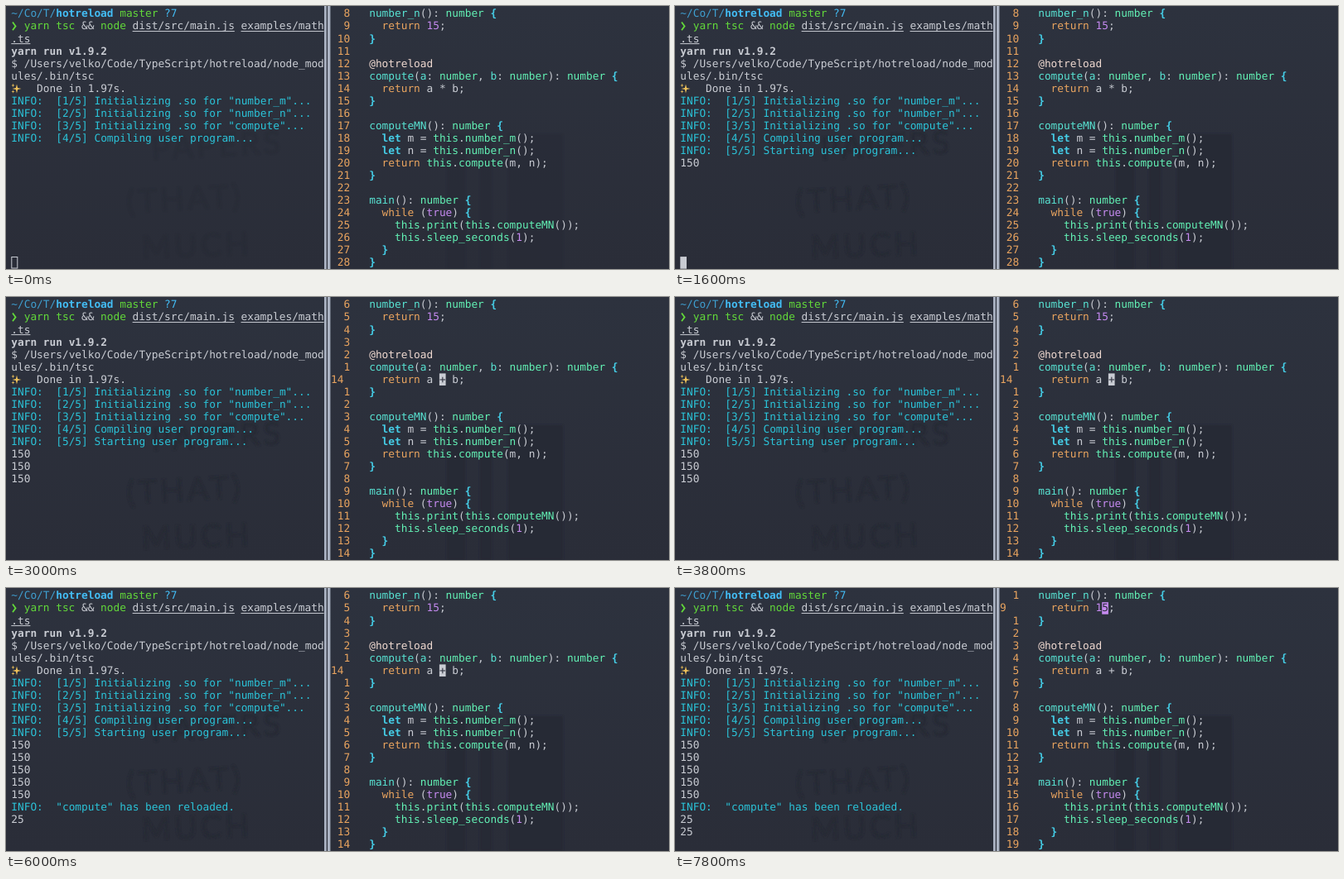
An HTML page that plays this animation: 800x318 px, repeating every 8000 ms.

```html
<!DOCTYPE html>
<html lang="en">
<head>
<meta charset="utf-8">
<title>Hot reload terminal</title>
<style>
  html, body { margin: 0; width: 100%; height: 100%; overflow: hidden; background: #2b2f3b; }
  svg { display: block; width: 100vw; height: 100vh; }
  text { white-space: pre; text-rendering: geometricPrecision; }
  #screen { font: 12.8px "DejaVu Sans Mono", monospace; }
  #wall text { font: 38px Lato, sans-serif; fill: #262a34; letter-spacing: 4px; }
</style>
</head>
<body>
<svg viewBox="0 0 800 318" preserveAspectRatio="none">
  <defs>
    <linearGradient id="shade" x1="0" y1="0" x2="0" y2="1">
      <stop offset="0" stop-color="#2d323e"/>
      <stop offset="1" stop-color="#2a2d38"/>
    </linearGradient>
    <filter id="soft"><feGaussianBlur stdDeviation="1.2"/></filter>
  </defs>
  <rect width="800" height="318" fill="url(#shade)"/>
  <g id="wall" filter="url(#soft)">
    <text x="176" y="186" transform="rotate(-3 176 186)">PAPERS</text>
    <text x="146" y="250" transform="rotate(-3 146 250)">(THAT)</text>
    <text x="164" y="305" transform="rotate(-2 164 305)">MUCH</text>
    <path d="M532 155h22v163h-22zM572 155h14v163h-14zM606 155h66v163h-66z" fill="#272b35"/>
  </g>
  <g id="screen"></g>
  <path d="M384 0h2.8v318h-2.8zM388 0h3.4v318h-3.4z" fill="#a9b1c1"/>
</svg>
<script>
const LOOP = 8000, CW = 7.7, RH = 15.05, BASE = 13.4;
const LEFT = 6.3, PANE = 392, CODE = 438.2;
const C = {
  text: '#c9ccd3', cyan: '#2bc3d8', sky: '#43bdf5', path: '#3f9fd0', green: '#62d83a',
  orange: '#e9a45f', purple: '#c58af0', mint: '#62f0b4', def: '#58e2d2', key: '#45cde6',
  deco: '#efd9d0', back: '#2b2f3b'
};
const FIRST = 7;
const SOURCE = `@hotreload
number_n(): number {
  return 15;
}

@hotreload
compute(a: number, b: number): number {
  return a * b;
}

computeMN(): number {
  let m = this.number_m();
  let n = this.number_n();
  return this.compute(m, n);
}

main(): number {
  while (true) {
    this.print(this.computeMN());
    this.sleep_seconds(1);
  }
}`.split('\n');

// Output lines: time shown, text, colour
const OUTPUT = [
  [0, 'INFO:  [1/5] Initializing .so for "number_m"...', C.cyan],
  [0, 'INFO:  [2/5] Initializing .so for "number_n"...', C.cyan],
  [0, 'INFO:  [3/5] Initializing .so for "compute"...', C.cyan],
  [0, 'INFO:  [4/5] Compiling user program...', C.cyan],
  [800, 'INFO:  [5/5] Starting user program...', C.cyan],
  ...[1, 2, 3, 4, 5].map(s => [s * 1000, '150', C.text]),
  [5200, 'INFO:  "compute" has been reloaded.', C.cyan],
  [6000, '25', C.text],
  [7000, '25', C.text]
];

// Editor cursor: start time, line (0 = unfocused), column
const CURSOR = [
  [0, 0, 0], [2000, 14, 11], [4400, 0, 0], [6000, 14, 11], [6400, 13, 11],
  [6800, 12, 9], [7000, 11, 0], [7200, 10, 0], [7400, 9, 11], [7600, 9, 10]
];

const esc = s => s.replace(/&/g, '&amp;').replace(/</g, '&lt;');
const baseline = row => BASE + row * RH;

function put(x, row, s, fill = C.text, bold = false) {
  return `<text x="${x.toFixed(2)}" y="${baseline(row).toFixed(2)}" fill="${fill}"` +
    `${bold ? ' font-weight="700"' : ''}>${esc(s)}</text>`;
}

const term = (col, row, s, fill, bold) => put(LEFT + col * CW, row, s, fill, bold);

function linked(col, row, s) {
  const x = LEFT + col * CW;
  return put(x, row, s) +
    `<rect x="${x}" y="${baseline(row) + 1.6}" width="${s.length * CW}" height="1" fill="${C.text}"/>`;
}

function block(x, row, fill) {
  return `<rect x="${x}" y="${baseline(row) - 11.3}" width="${CW}" height="14.6" fill="${fill}"/>`;
}

function star(x, y, r) {
  const q = r * 0.2;
  return `<path d="M${x} ${y - r}l${q} ${r - q} ${r - q} ${q} ${q - r} ${q} ${-q} ${r - q} ` +
    `${-q} ${q - r} ${q - r} ${-q} ${r - q} ${-q}z" fill="#f0c35a"/>`;
}

const header = [
  term(0, 0, '~/Co/T/', C.path), term(7, 0, 'hotreload', C.sky, true),
  term(17, 0, 'master', C.green), term(24, 0, '?7', C.sky),
  '<path d="M8 19.5l3.6 4.9-3.6 4.9" fill="none" stroke="#62d83a" stroke-width="1.8"/>',
  term(2, 1, 'yarn', C.green), term(7, 1, 'tsc', C.green), term(11, 1, '&&'),
  term(14, 1, 'node', C.green), linked(19, 1, 'dist/src/main.js'), linked(36, 1, 'examples/math'),
  linked(0, 2, '.ts'),
  term(0, 3, 'yarn run v1.9.2', C.text, true),
  term(0, 4, '$ /Users/velko/Code/TypeScript/hotreload/node_mod'),
  term(0, 5, 'ules/.bin/tsc'),
  star(13, 100, 5.5), star(8.5, 96, 2.4), star(8.5, 103.5, 2.2),
  term(4, 6, 'Done in 1.97s.')
].join('');

function tint(word, line, at) {
  const next = line[at + word.length];
  if (word[0] === '@') return [C.deco];
  if (/^(return|while)$/.test(word)) return [C.orange];
  if (/^(let|[{}])$/.test(word)) return [C.key, true];
  if (/^(true|\d+)$/.test(word)) return [C.purple];
  if (/^(this|number)$/.test(word)) return [C.mint];
  if (next === '(' && /\w/.test(word)) return [at ? C.mint : C.def];
  if (next === ':' && /\w/.test(word)) return [C.def];
  return [C.text];
}

function codeLine(line, row, cursorCol) {
  let out = '', under = C.text;
  for (const m of line.matchAll(/@?\w+|[^\w\s]/g)) {
    const [fill, bold] = tint(m[0], line, m.index);
    out += put(CODE + m.index * CW, row, m[0], fill, bold);
    if (cursorCol >= m.index && cursorCol < m.index + m[0].length) under = fill;
  }
  if (cursorCol < 0) return out;
  const x = CODE + cursorCol * CW;
  return out + block(x, row, under) + put(x, row, line[cursorCol] || '', C.back);
}

function lineNumber(n, row, current) {
  if (n === current) return put(PANE, row, String(n), C.orange);
  const s = String(current ? Math.abs(n - current) : n);
  return put(PANE + (3 - s.length) * CW, row, s, C.orange);
}

function editor(t) {
  const [, current, col] = CURSOR.findLast(c => c[0] <= t);
  return SOURCE.map((line, i) => {
    const n = FIRST + i, row = i - 1;
    const text = n === 14 && t >= 2600 ? line.replace('*', '+') : line;
    return lineNumber(n, row, current) + codeLine(text, row, n === current ? col : -1);
  }).join('');
}

function terminal(t) {
  let out = header;
  OUTPUT.forEach(([from, s, fill], i) => { if (t >= from) out += term(0, 7 + i, s, fill); });
  if (t < 600) {
    out += `<rect x="6.8" y="303.5" width="7" height="13.5" fill="none" stroke="${C.text}"/>`;
  } else if (t < 2000 || (t >= 4400 && t < 6000)) {
    out += block(LEFT, 20, C.text);
  }
  return out;
}

const screenEl = document.getElementById('screen');
const wall = document.getElementById('wall');
let shown = '';

function draw() {
  const t = performance.now() % LOOP;
  const next = terminal(t) + editor(t);
  if (next !== shown) screenEl.innerHTML = shown = next;
  wall.setAttribute('opacity', Math.min(1, 0.4 + t / 2000).toFixed(2));
  requestAnimationFrame(draw);
}
draw();
</script>
</body>
</html>
```
